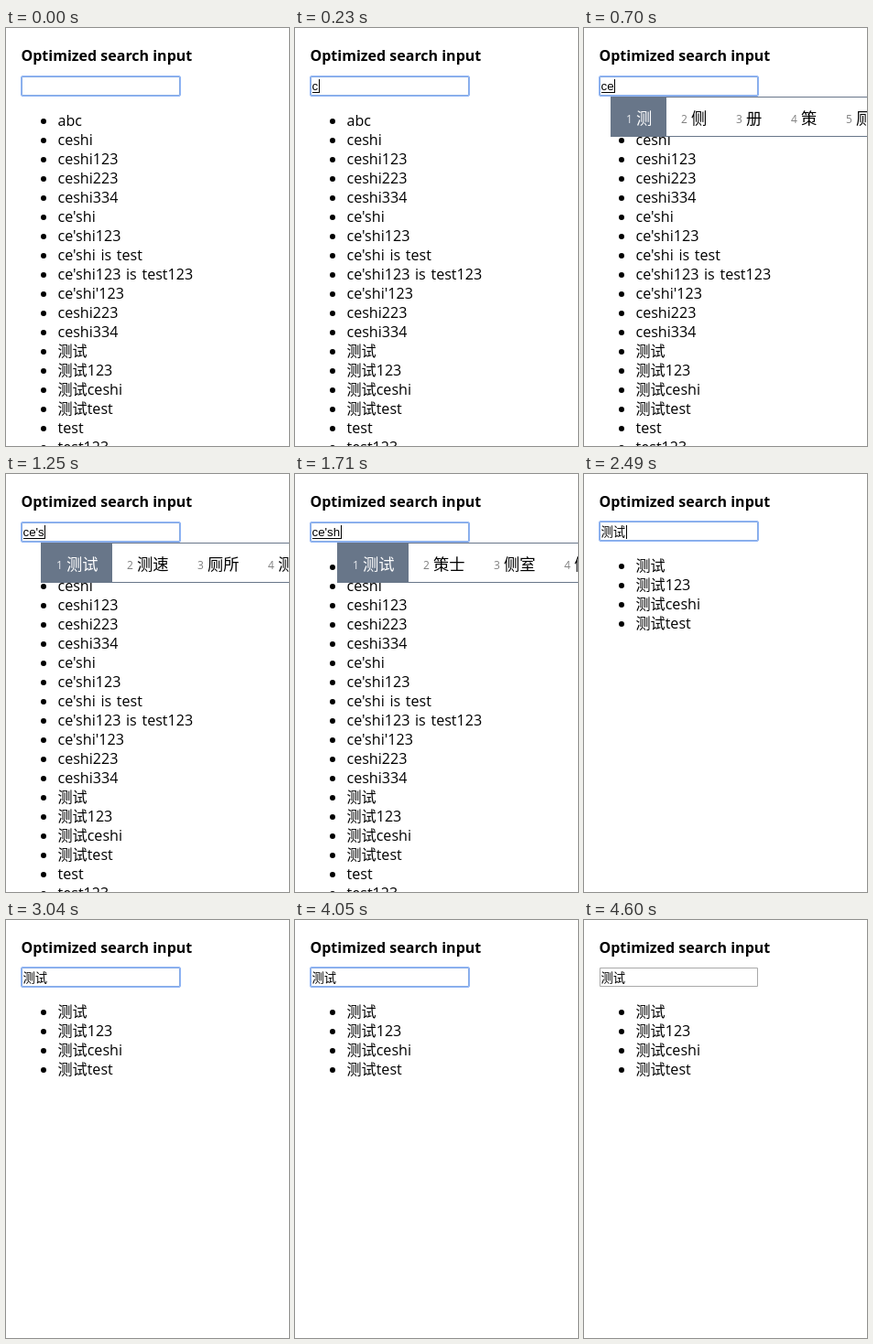
These frames come from a looping animation (309x457 px, 4680 ms). An HTML page with a canvas:

```html
<!DOCTYPE html>
<html lang="zh-CN">
<head>
<meta charset="utf-8">
<title>Optimized search input</title>
<style>
  html, body { margin: 0; width: 100%; height: 100%; overflow: hidden; background: #fff; }
  canvas { display: block; width: 309px; height: 457px; }
</style>
</head>
<body>
<canvas id="stage"></canvas>
<script>
const W = 309, H = 457, LOOP = 4680;
const UI = '"Open Sans", "Noto Sans CJK SC", "Noto Sans CJK", sans-serif';
const FIELD = '"Liberation Sans", "Noto Sans CJK SC", "Noto Sans CJK", sans-serif';
const SLATE = '#687689';

const ITEMS = ['abc', 'ceshi', 'ceshi123', 'ceshi223', 'ceshi334', "ce'shi",
  "ce'shi123", "ce'shi is test", "ce'shi123 is test123", "ce'shi'123",
  'ceshi223', 'ceshi334', '测试', '测试123', '测试ceshi', '测试test', 'test', 'test123'];
const MATCHES = ITEMS.filter(s => s.startsWith('测试'));

// Each state holds until the next one starts.
const STATES = [
  { at: 0, text: '' },
  { at: 230, text: 'c', caret: true },
  { at: 320, text: 'c', caret: true, left: 22, words: ['从', '才', '次', '错', '此'] },
  { at: 700, text: 'ce', caret: true, left: 29, words: ['测', '侧', '册', '策', '厕'] },
  { at: 1250, text: "ce's", caret: true, left: 38, words: ['测试', '测速', '厕所', '测算'] },
  { at: 1710, text: "ce'sh", caret: true, left: 46, words: ['测试', '策士', '侧室', '侧视'] },
  { at: 2110, text: "ce'shi", caret: true, left: 49, words: ['测试', '策士', '侧室', '侧视'] },
  { at: 2490, text: '测试', done: true, caret: true },
  { at: 3040, text: '测试', done: true },
  { at: 3590, text: '测试', done: true, caret: true },
  { at: 4050, text: '测试', done: true },
  { at: 4600, text: '测试', done: true, blurred: true }
];

const canvas = document.getElementById('stage');
const ctx = canvas.getContext('2d', { alpha: false });
const dpr = window.devicePixelRatio || 1;
canvas.width = W * dpr;
canvas.height = H * dpr;

function rect(x, y, w, h, color) {
  ctx.fillStyle = color;
  ctx.fillRect(x, y, w, h);
}

function label(text, x, y, font, color = '#000') {
  ctx.font = font;
  ctx.fillStyle = color;
  ctx.fillText(text, x, y);
}

function frame(x, y, w, h, color, radius = 0) {
  ctx.strokeStyle = color;
  ctx.lineWidth = 1;
  ctx.beginPath();
  ctx.roundRect(x + 0.5, y + 0.5, w - 1, h - 1, radius);
  ctx.stroke();
}

function drawList(items, top) {
  ctx.wordSpacing = '1.5px';
  items.forEach((item, i) => {
    const y = top + i * 21;
    ctx.fillStyle = '#000';
    ctx.beginPath();
    ctx.arc(41, y + 12, 3, 0, Math.PI * 2);
    ctx.fill();
    label(item, 56.5, y + 17, `16.1px ${UI}`);
  });
  ctx.wordSpacing = '0px';
}

function drawField({ text, caret, done, blurred }) {
  const top = done ? 52 : 53;
  if (blurred) {
    frame(17, top, 173, 21, '#a9a9a9');
  } else {
    frame(16, top - 1, 175, 23, '#8fb4f5', 1.5);
    frame(17, top, 173, 21, '#86abe6');
  }
  label(text, 18.5, 68, `13.333px ${FIELD}`);
  const end = Math.round(19 + ctx.measureText(text).width);
  if (text && !done) rect(19, 70, end - 19, 1, '#000');
  if (caret) rect(end, 56, 1, 15, '#000');
}

function drawCandidates({ left, words }) {
  const pitch = 43 + 17 * words[0].length;
  rect(left, 75, W - left, 44, '#fff');
  rect(left, 75, W - left, 1, SLATE);
  rect(left, 118, W - left, 1, SLATE);
  rect(left, 75, pitch + 1, 44, SLATE);
  words.forEach((word, i) => {
    const x = left + i * pitch;
    label(i + 1, x + 17, 104, `12px ${UI}`, i ? '#808080' : '#e8ebee');
    label(word, x + 28, 104.5, `17.3px ${UI}`, i ? '#000' : '#fff');
  });
}

function draw(now) {
  const t = now % LOOP;
  const state = STATES.findLast(s => s.at <= t);
  ctx.setTransform(dpr, 0, 0, dpr, 0, 0);
  rect(0, 0, W, H, '#fff');
  label('Optimized search input', 16.5, 36, `bold 16px ${UI}`);
  drawList(state.done ? MATCHES : ITEMS, state.done ? 89 : 90);
  drawField(state);
  if (state.words) drawCandidates(state);
}

const start = performance.now();
function tick() {
  draw(performance.now() - start);
  requestAnimationFrame(tick);
}
tick();
</script>
</body>
</html>
```
